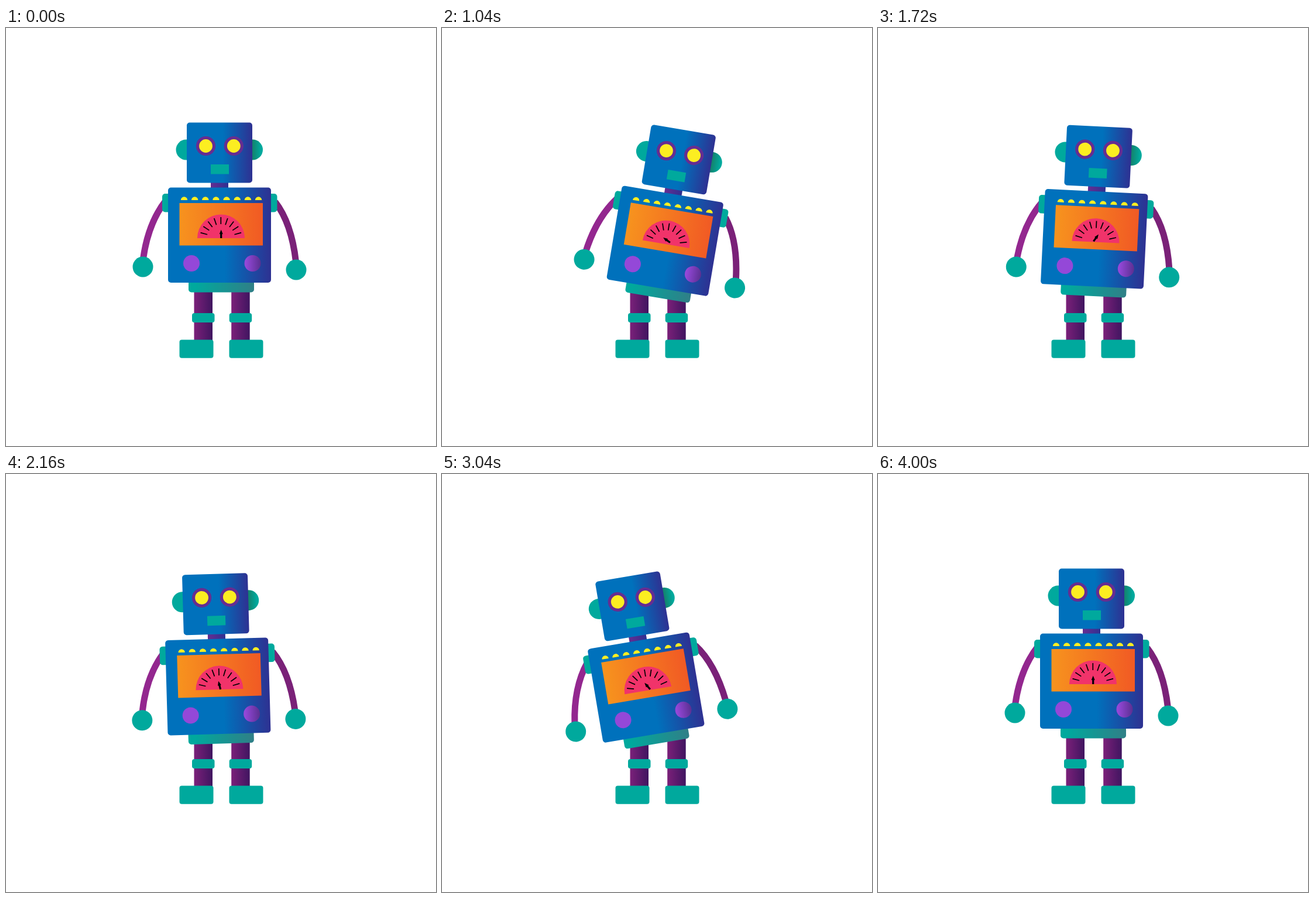
An HTML page for the animation above (4040 ms loop, 735 by 714 pixels).

```html
<!DOCTYPE html>
<html lang="en">
<head>
<meta charset="utf-8">
<title>Dancing robot</title>
<style>
  html, body { margin: 0; width: 100%; height: 100%; overflow: hidden; background: #fff; }
  svg { display: block; width: 735px; height: 714px; }
  .teal { fill: #00a99d; }
</style>
</head>
<body>
<svg viewBox="0 0 735 714">
  <defs>
    <linearGradient id="blue">
      <stop offset=".55" stop-color="#0071bc"/><stop offset="1" stop-color="#2e3192"/>
    </linearGradient>
    <linearGradient id="neck">
      <stop stop-color="#662d91"/><stop offset="1" stop-color="#2e3192"/>
    </linearGradient>
    <linearGradient id="leg">
      <stop stop-color="#7b2079"/><stop offset="1" stop-color="#401560"/>
    </linearGradient>
    <linearGradient id="skirt">
      <stop offset=".1" stop-color="#00a99d"/><stop offset="1" stop-color="#307f87"/>
    </linearGradient>
    <linearGradient id="ear">
      <stop offset=".45" stop-color="#157f68"/><stop offset=".9" stop-color="#00a99d"/>
    </linearGradient>
    <linearGradient id="panel">
      <stop stop-color="#f7931e"/><stop offset="1" stop-color="#f15a24"/>
    </linearGradient>
    <linearGradient id="knob">
      <stop offset=".1" stop-color="#9448d8"/><stop offset="1" stop-color="#5b2f91"/>
    </linearGradient>
  </defs>

  <g id="legs"></g>

  <g id="robot">
    <g fill="none" stroke-width="11">
      <path d="M273 295Q243 333 234.5 394" stroke="#93278f"/>
      <path d="M460 297Q488 333 495.5 399" stroke="#7a2178"/>
    </g>
    <g class="teal">
      <circle cx="234" cy="408" r="17.5"/>
      <circle cx="496" cy="413" r="17.5"/>
      <rect x="267" y="283" width="20" height="31.5" rx="5"/>
      <rect x="443" y="283" width="20.5" height="31.5" rx="5"/>
      <circle cx="308" cy="208" r="17.5"/>
    </g>
    <circle cx="421.5" cy="208" r="17.5" fill="url(#ear)"/>
    <rect x="312" y="425" width="112" height="26.5" rx="5" fill="url(#skirt)"/>
    <rect x="350" y="260" width="30" height="16" fill="url(#neck)"/>
    <rect x="309" y="161.5" width="112" height="103" rx="5" fill="url(#blue)"/>
    <rect x="277" y="272.5" width="176" height="162.5" rx="5" fill="url(#blue)"/>
    <g fill="#fcee21" stroke="#662d91" stroke-width="5.2">
      <circle cx="341.5" cy="201.5" r="14"/>
      <circle cx="389.3" cy="201.5" r="14"/>
    </g>
    <rect class="teal" x="350" y="233" width="31" height="16.5"/>
    <g id="bulbs" fill="#fcee21"></g>
    <rect x="296.5" y="299" width="142.5" height="72.5" fill="url(#panel)"/>
    <path d="M327 359a40.5 40.5 0 0 1 81 0z" fill="#f1336a"/>
    <g id="ticks" stroke="#000" stroke-width="1.7"></g>
    <path id="needle" d="M367.7 344.5l3 7.5h-1.4v7h-3.2v-7h-1.4z"/>
    <circle cx="317" cy="402" r="14" fill="#9448d8"/>
    <circle cx="421.5" cy="402" r="14" fill="url(#knob)"/>
  </g>
</svg>
<script>
  const $ = id => document.getElementById(id);
  const repeat = (n, make) => Array.from({ length: n }, (_, i) => make(i)).join('');

  $('legs').innerHTML = repeat(2, i => {
    const x = 63.7 * i;
    return `<rect x="${321.5 + x}" y="440" width="31.5" height="95" fill="url(#leg)"/>
      <rect class="teal" x="${318 + x}" y="487" width="38.5" height="16" rx="4"/>
      <rect class="teal" x="${296.5 + 85 * i}" y="532.5" width="58" height="31.3" rx="4"/>`;
  });
  $('bulbs').innerHTML = repeat(8, i =>
    `<path d="M${298.8 + 18.15 * i} 294a5.7 5.7 0 0 1 11.4 0z"/>`);
  $('ticks').innerHTML = repeat(9, i =>
    `<path d="M367.3 323v12" transform="rotate(${(i - 4) * 18.75} 367.3 359)"/>`);

  // [time in ms, needle angle]
  const swings = [[0, 0], [440, 12], [1040, -64], [1720, 33], [2560, -52], [3040, -32], [4000, 0]];
  const ease = p => (1 - Math.cos(Math.PI * p)) / 2;

  function needleAngle(t) {
    const i = Math.max(1, swings.findIndex(([time]) => time >= t));
    const [t0, a0] = swings[i - 1], [t1, a1] = swings[i];
    return a0 + (a1 - a0) * ease((t - t0) / (t1 - t0));
  }

  function draw(now) {
    const t = Math.floor(now % 4040 / 40) * 40;
    // Steady rocking to 10 degrees each side, with a bob every 400 ms
    const tilt = t < 1000 ? t / 100 : t < 3000 ? 20 - t / 100 : t / 100 - 40;
    const bob = 10 * ease(t / 200);
    $('robot').setAttribute('transform', `translate(0 ${bob}) rotate(${tilt} 368 451)`);
    $('needle').setAttribute('transform', `rotate(${needleAngle(t)} 367.7 352)`);
  }

  const start = performance.now();
  function loop() {
    draw(performance.now() - start);
    requestAnimationFrame(loop);
  }
  loop();
</script>
</body>
</html>
```
